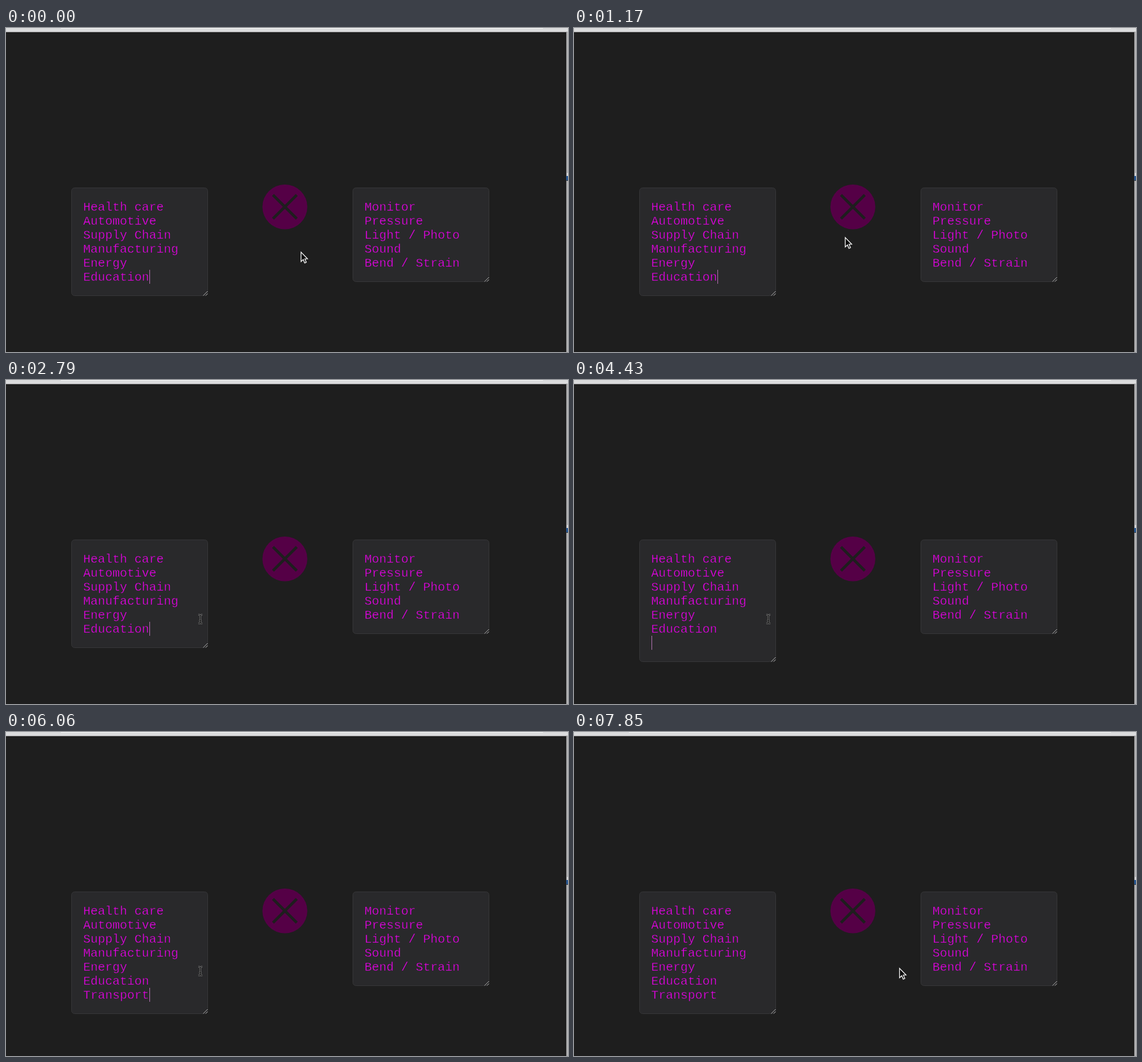
An HTML page with a canvas for the animation above (8000 ms loop, 921 by 532 pixels).

```html
<!DOCTYPE html>
<html lang="en">
<head>
<meta charset="utf-8">
<title>Word lists</title>
<style>
html, body { margin: 0; width: 100%; height: 100%; overflow: hidden; background: #1e1e1e; }
canvas { display: block; }
</style>
</head>
<body>
<canvas id="stage" width="921" height="532"></canvas>
<script>
const ctx = document.getElementById('stage').getContext('2d');
const LOOP = 8000, STEP = 148, BLINK = 500;
const LINE = 23, CHAR = 12, TOP = 262, WIDTH = 224;
const ENTER = 3360, TYPE_START = 4990, TYPE_END = 6010;
const fields = ['Health care', 'Automotive', 'Supply Chain', 'Manufacturing', 'Energy', 'Education'];
const sensors = ['Monitor', 'Pressure', 'Light / Photo', 'Sound', 'Bend / Strain'];
const word = 'Transport';

const smooth = u => u * u * (3 - 2 * u);
const easeOut = u => u * (2 - u);
const clamp = u => Math.min(1, Math.max(0, u));

// Pointer strokes; lift bends the path upwards
const home = { x: 483, y: 368 };
const glides = [
  { from: 150, to: 1170, x: 444, y: 344, lift: 0, ease: smooth },
  { from: 1184, to: 1776, x: 318.5, y: 392.5, lift: -18, ease: smooth },
  { from: 6364, to: 7104, x: 638, y: 397, lift: 12, ease: easeOut },
  { from: 7252, to: 7844, x: 533, y: 388, lift: 16, ease: smooth }
];

function pointerAt(t) {
  let { x, y } = home;
  for (const g of glides) {
    const u = g.ease(clamp((t - g.from) / (g.to - g.from)));
    x += (g.x - x) * u;
    y += (g.y - y) * u - g.lift * 4 * u * (1 - u);
  }
  return { x, y };
}

function linesAt(t) {
  if (t < ENTER) return fields;
  const u = (t - TYPE_START) / (TYPE_END - TYPE_START);
  const count = u < 0 ? 0 : 1 + Math.floor((word.length - 1) * clamp(u) ** 1.5);
  return [...fields, word.slice(0, count)];
}

// The blink restarts at every edit
function caretOn(t) {
  const edit = t < ENTER ? -270 : t < TYPE_START ? ENTER : Math.min(t, TYPE_END);
  return Math.floor((t - edit) / BLINK) % 2 === 0;
}

function rect(color, x, y, w, h) {
  ctx.fillStyle = color;
  ctx.fillRect(x, y, w, h);
}

function line(color, width, x1, y1, x2, y2) {
  ctx.strokeStyle = color;
  ctx.lineWidth = width;
  ctx.beginPath();
  ctx.moveTo(x1, y1);
  ctx.lineTo(x2, y2);
  ctx.stroke();
}

function drawFrame() {
  rect('#1e1e1e', 0, 0, 921, 532);
  rect('#dbdcdd', 0, 0, 921, 6);
  rect('#a0a0a2', 0, 6, 918, 1);
  rect('#f8f8f8', 90, 0, 790, 1);
  rect('#8a8a8c', 918, 6, 1, 526);
  rect('#b2b2b4', 919, 6, 2, 526);
  rect('#d8d8da', 919, 238, 2, 5);
  rect('#28568f', 918, 243, 3, 7);
  rect('#3a3a3c', 918, 250, 3, 1);
}

function drawButton() {
  const x = 457, y = 293.7, arm = 19.5;
  ctx.fillStyle = '#550046';
  ctx.beginPath();
  ctx.arc(x, y, 36.8, 0, Math.PI * 2);
  ctx.fill();
  for (const s of [-1, 1]) line('#1e1e1e', 4.6, x - arm, y - s * arm, x + arm, y + s * arm);
}

function drawBox(x, lines) {
  const h = lines.length * LINE + 40, r = x + WIDTH, b = TOP + h;
  ctx.beginPath();
  ctx.roundRect(x + .5, TOP + .5, WIDTH - 1, h - 1, 5);
  ctx.fillStyle = '#29292b';
  ctx.fill();
  ctx.strokeStyle = '#363638';
  ctx.lineWidth = 1;
  ctx.stroke();
  for (const d of [4, 8]) {
    line('#141415', 1, r - d - 1, b - .5, r - .5, b - d - 1);
    line('#bcbcbc', 1, r - d, b - .5, r - .5, b - d);
  }
  ctx.font = "20px 'Courier New', 'Liberation Mono', monospace";
  ctx.fillStyle = '#ee00ee';
  ctx.strokeStyle = '#29292b';
  ctx.lineWidth = .4;
  lines.forEach((s, i) => {
    const y = 300 + i * LINE;
    ctx.fillText(s, x + 19.5, y);
    ctx.strokeText(s, x + 19.5, y); // thins the stems
  });
}

function drawCaret(lines) {
  const row = lines.length - 1;
  rect('#b070b0', 127 + lines[row].length * CHAR, TOP + 20 + row * LINE, 1, LINE);
}

function drawArrow(x, y) {
  const pts = [[0, 0], [0, 15.5], [3.6, 12.2], [6, 17.8], [8.6, 16.7], [6.2, 11.2], [10.6, 11]];
  ctx.beginPath();
  for (const [dx, dy] of pts) ctx.lineTo(x + .5 + dx, y + dy);
  ctx.closePath();
  ctx.fillStyle = '#080808';
  ctx.fill();
  ctx.strokeStyle = '#f4f4f4';
  ctx.lineWidth = 1.3;
  ctx.stroke();
}

function drawBeam(x, y) {
  ctx.beginPath();
  for (const s of [-1, 1]) {
    ctx.moveTo(x - 3.2, y + s * 7);
    ctx.quadraticCurveTo(x, y + s * 7, x, y + s * 5);
    ctx.quadraticCurveTo(x, y + s * 7, x + 3.2, y + s * 7);
  }
  ctx.moveTo(x, y - 5.5);
  ctx.lineTo(x, y + 5.5);
  ctx.moveTo(x - 2, y + 3);
  ctx.lineTo(x + 2, y + 3);
  for (const [color, width] of [['#8e8e8e', 2.4], ['#101010', 1.2]]) {
    ctx.strokeStyle = color;
    ctx.lineWidth = width;
    ctx.stroke();
  }
}

function draw(time) {
  const t = Math.floor(time / STEP + .15) * STEP;
  const lines = linesAt(t);
  drawFrame();
  drawButton();
  drawBox(107, lines);
  drawBox(568, sensors);
  if (caretOn(t)) drawCaret(lines);
  const { x, y } = pointerAt(t);
  const overText = [107, 568].some(left => x > left && x < left + WIDTH);
  (overText ? drawBeam : drawArrow)(x, y);
}

const start = performance.now();
function tick() {
  draw((performance.now() - start) % LOOP);
  requestAnimationFrame(tick);
}
tick();
</script>
</body>
</html>
```
